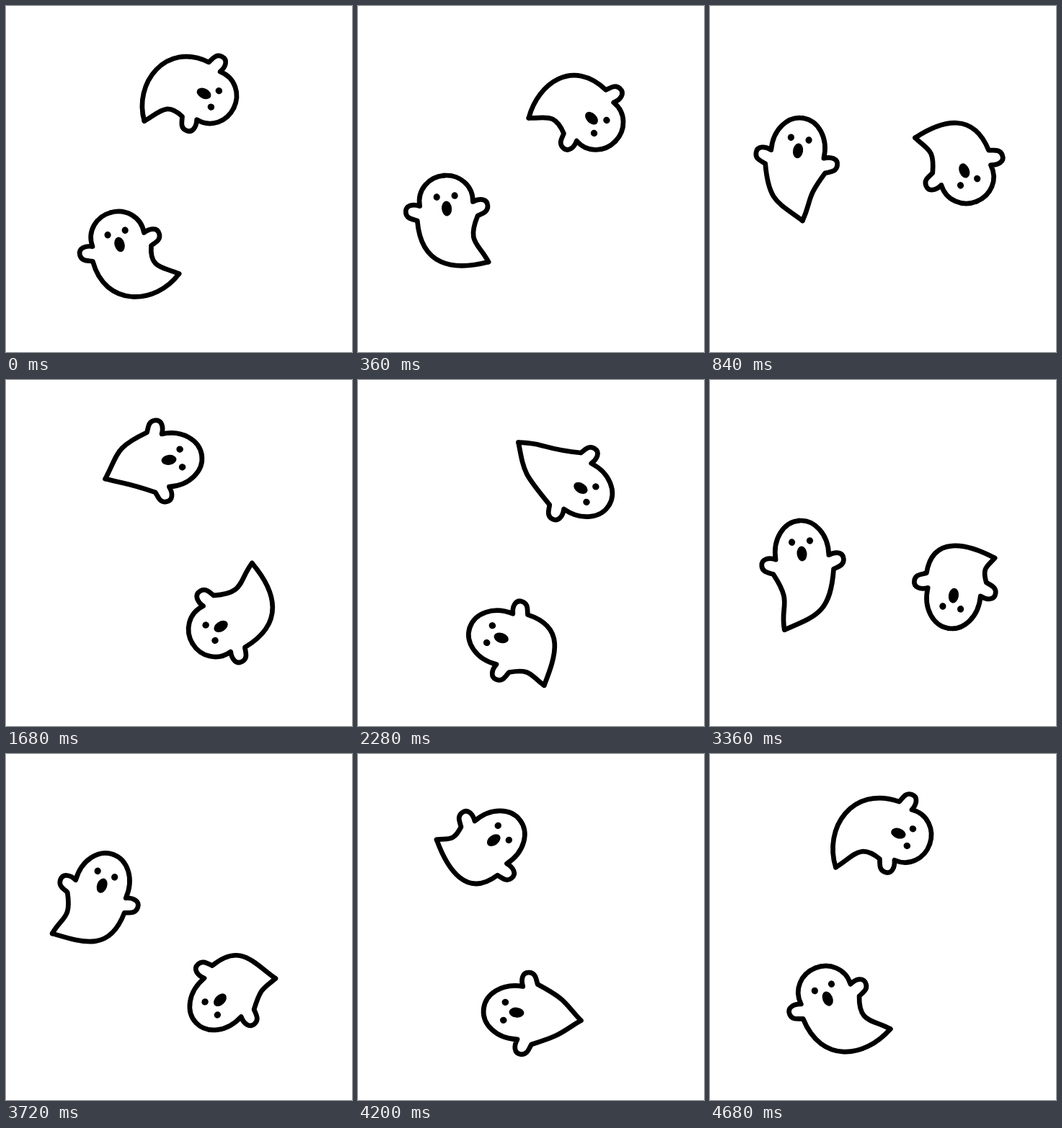
Recreate the animation shown at these times as an HTML page with a canvas. Size 480 px wide and 480 px high, loop 4.8 s.

```html
<!DOCTYPE html>
<html lang="en">
<head>
<meta charset="utf-8">
<title>Circling ghosts</title>
<style>
html, body { margin: 0; width: 100%; height: 100%; overflow: hidden; background: #fff; }
canvas { display: block; width: 480px; height: 480px; }
</style>
</head>
<body>
<canvas id="stage" width="480" height="480"></canvas>
<script>
const ctx = document.getElementById('stage').getContext('2d');
const STEP = 120, STEPS = 40, CX = 236, CY = 237, DEG = Math.PI / 180;

const mix = (a, b, k) => a + (b - a) * k;
const mixAngle = (a, b, k) => {
  const turns = (b - a) / (2 * Math.PI);
  return a + (turns - Math.round(turns)) * 2 * Math.PI * k;
};

// x, y: middle of the head; tilt: lean of the ghost;
// swing, reach: direction and distance of the tail tip, seen from the head
const pose = (step, x, y, tilt, swing, reach) => ({
  step, reach,
  orbit: Math.atan2(y - CY, x - CX),
  radius: Math.hypot(x - CX, y - CY),
  tilt: tilt * DEG,
  swing: swing * DEG
});

const ghosts = [
  [
    pose(0, 280, 124, 116, 48, 95),
    pose(7, 355, 234, 158, 32, 87),
    pose(14, 293, 345, 239, 31, 103),
    pose(19, 193, 356, 288, -28, 94),
    pose(28, 127, 235, 355, -17, 114),
    pose(35, 193, 116, 53, -35, 84),
    pose(39, 267, 112, 109, 45, 103)
  ],
  [
    pose(0, 156, 325, -15, 46, 96),
    pose(7, 123, 195, 9, 12, 103),
    pose(14, 232, 110, 82, 8, 98),
    pose(19, 314, 153, 121, -5, 113),
    pose(28, 337, 305, 189, -36, 82),
    pose(35, 214, 358, 276, -1, 96),
    pose(39, 161, 334, 338, 40, 101)
  ]
];

function poseAt(poses, step) {
  let i = poses.length - 1;
  while (poses[i].step > step) i--;
  const a = poses[i], b = poses[(i + 1) % poses.length];
  const k = (step - a.step) / ((b.step - a.step + STEPS) % STEPS);
  const orbit = mixAngle(a.orbit, b.orbit, k);
  const radius = mix(a.radius, b.radius, k);
  return {
    x: CX + radius * Math.cos(orbit),
    y: CY + radius * Math.sin(orbit),
    tilt: mixAngle(a.tilt, b.tilt, k),
    swing: mix(a.swing, b.swing, k),
    reach: mix(a.reach, b.reach, k)
  };
}

// One side of the outline, from the crown to the tail tip; s is -1 or 1.
function drawSide(s, drop, swing, reach) {
  const tx = Math.sin(swing) * reach, ty = Math.cos(swing) * reach;
  const px = s * 42, py = drop + 14;
  const far = Math.hypot(tx - px, ty - py);
  const curl = swing * 1.95, sin = Math.sin(curl), cos = Math.cos(curl);
  const slant = 0.55 * Math.max(0, Math.cos(curl - s * 40 * DEG));
  const down = far * 0.55, back = far * 0.35, out = far * 0.28 * s;

  ctx.beginPath();
  ctx.moveTo(0, -40);
  ctx.bezierCurveTo(s * 21, -40, s * 39, -40 + (drop + 34) * 0.42, s * 37, drop - 6);
  ctx.bezierCurveTo(s * 46, drop - 10, s * 57, drop - 9, s * 57, drop + 1);
  ctx.bezierCurveTo(s * 57, drop + 10, s * 49, drop + 11, px, py);
  ctx.bezierCurveTo(px - s * slant * down, py + down,
    tx - sin * back + cos * out, ty - cos * back - sin * out, tx, ty);
  ctx.stroke();
}

function oval(x, y, rx, ry) {
  ctx.beginPath();
  ctx.ellipse(x, y, rx, ry, 0, 0, 2 * Math.PI);
  ctx.fill();
}

function drawGhost({ x, y, tilt, swing, reach }) {
  // the arms rise when the tail swings far to the right
  const drop = 11 - 6 * Math.tanh((swing / DEG - 22) / 6);
  ctx.save();
  ctx.translate(x, y);
  ctx.rotate(tilt);
  for (const s of [-1, 1]) {
    drawSide(s, drop, swing, reach);
    oval(s * 12.5, -11, 4.6, 4.8);
  }
  oval(0, 6, 7, 10.5);
  ctx.restore();
}

function draw(now) {
  const step = Math.floor(now / STEP) % STEPS;
  ctx.fillStyle = '#fff';
  ctx.fillRect(0, 0, 480, 480);
  ctx.fillStyle = ctx.strokeStyle = '#000';
  ctx.lineWidth = 6.7;
  ctx.lineJoin = ctx.lineCap = 'round';
  for (const poses of ghosts) drawGhost(poseAt(poses, step));
}

const start = performance.now();
function tick() {
  draw(performance.now() - start);
  requestAnimationFrame(tick);
}
tick();
</script>
</body>
</html>
```
